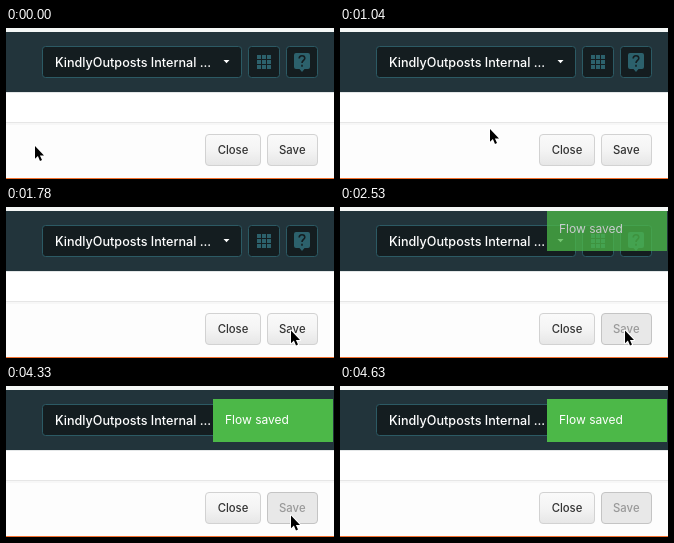
Recreate the animation shown at these times as an HTML page. Size 328x151 px, loop 5060 ms.

```html
<!DOCTYPE html>
<html lang="en">
<head>
<meta charset="utf-8">
<title>Saving a flow</title>
<style>
  html, body { margin: 0; width: 100%; height: 100%; overflow: hidden; background: #fff; }
  svg { display: block; width: 328px; height: 151px; }
  text { font-family: Inter, Arial, sans-serif; }
  .title { font-size: 12.6px; font-weight: 500; fill: #fff; }
  .label { font-size: 11.3px; font-weight: 500; fill: #333; text-anchor: middle; }
  .field { fill: #141d20; stroke: #2c5a64; }
  .icon { fill: #2c616c; }
  .button { fill: url(#face); stroke: #d2d2d2; }
  .disabled .button { fill: #e8e8e8; stroke: #c4c4c4; }
  .disabled .label { fill: #999; }
</style>
</head>
<body>
<svg viewBox="0 0 328 151">
  <defs>
    <linearGradient id="face" x2="0" y2="1">
      <stop stop-color="#fafafa"/>
      <stop offset=".5" stop-color="#f4f4f4"/>
      <stop offset="1" stop-color="#e6e6e6"/>
    </linearGradient>
    <clipPath id="page"><path d="M0 4H328V151H0z"/></clipPath>
  </defs>

  <rect width="328" height="151" fill="#fff"/>
  <rect width="328" height="4" fill="#f4f7f6"/>
  <rect y="4" width="328" height="60" fill="#22343b"/>
  <rect y="64" width="328" height="1" fill="#e4e7e8"/>
  <rect y="94" width="328" height="1" fill="#e6e6e6"/>
  <rect y="95" width="328" height="2" fill="#f7f7f7"/>
  <rect y="97" width="328" height="53" fill="#fdfdfd"/>
  <rect y="150" width="328" height="1" fill="#f2702e"/>

  <rect class="field" x="36.5" y="18.5" width="199" height="31" rx="3"/>
  <text class="title" x="49" y="38.700">KindlyOutposts Internal ...</text>
  <path d="M217.500 32h6l-3 3.200z" fill="#fff"/>

  <rect class="field" x="242.5" y="18.5" width="31" height="31" rx="3"/>
  <g id="grid" class="icon"></g>
  <rect class="field" x="280.5" y="18.5" width="31" height="31" rx="3"/>
  <path class="icon" d="M290 25h12q2 0 2 2v12q0 2-2 2h-3.500l-2.500 3l-2.500-3H290q-2 0-2-2V27q0-2 2-2z"/>
  <path d="M293.200 30.500q0-2.800 2.800-2.800t2.800 2.600c0 2-2.800 2.200-2.800 4.700M296 36.800v2" fill="none" stroke="#141d20" stroke-width="1.600"/>

  <g>
    <rect class="button" x="199.500" y="106.500" width="55" height="31" rx="3.500"/>
    <text class="label" x="227" y="126">Close</text>
  </g>
  <g id="save">
    <rect class="button" x="261.500" y="106.500" width="50" height="31" rx="3.500"/>
    <text class="label" x="286.300" y="126">Save</text>
  </g>

  <g clip-path="url(#page)">
    <g id="toast">
      <rect x="207" width="120" height="43" fill="#4cb848"/>
      <text x="219" y="25" font-size="12" fill="#fff">Flow saved</text>
    </g>
  </g>

  <g id="cursor">
    <path d="M0 0V12.800L2.900 10.100L5 15L7 14.100L4.900 9.400H9Z"
      stroke="#fff" stroke-width="2" stroke-linejoin="round" paint-order="stroke"/>
  </g>
</svg>

<script>
const LOOP = 5060;
const $ = id => document.getElementById(id);

// Pointer stops: start time, x, y of the tip
const stops = [
  [0, 29, 118], [740, 50, 114], [890, 99, 105], [1040, 150, 101],
  [1190, 205, 104], [1340, 238, 111], [1480, 262, 118],
  [1630, 283.5, 123], [1780, 285, 123.5], [4330, 285, 129.5], [4480, 289, 144.5]
];

for (let i = 0; i < 9; i++) {
  const dot = document.createElementNS($('grid').namespaceURI, 'rect');
  const place = { x: 251 + i % 3 * 5, y: 27 + Math.floor(i / 3) * 5, width: 4, height: 4 };
  for (const key in place) dot.setAttribute(key, place[key]);
  $('grid').append(dot);
}

const show = (id, on) => $(id).setAttribute('visibility', on ? 'visible' : 'hidden');

function draw(time) {
  const t = time % LOOP;
  const [, x, y] = stops.findLast(stop => stop[0] <= t);
  $('cursor').setAttribute('transform', `translate(${x} ${y})`);
  show('cursor', t < 4630);

  const saved = t >= 2530;
  const settled = t >= 2680;
  $('save').setAttribute('class', saved ? 'disabled' : '');
  show('toast', saved);
  $('toast').setAttribute('transform', `translate(0 ${settled ? 13 : 1})`);
  $('toast').setAttribute('opacity', settled ? 1 : 0.76);
}

const start = performance.now();
function tick() {
  draw(performance.now() - start);
  requestAnimationFrame(tick);
}
tick();
</script>
</body>
</html>
```
